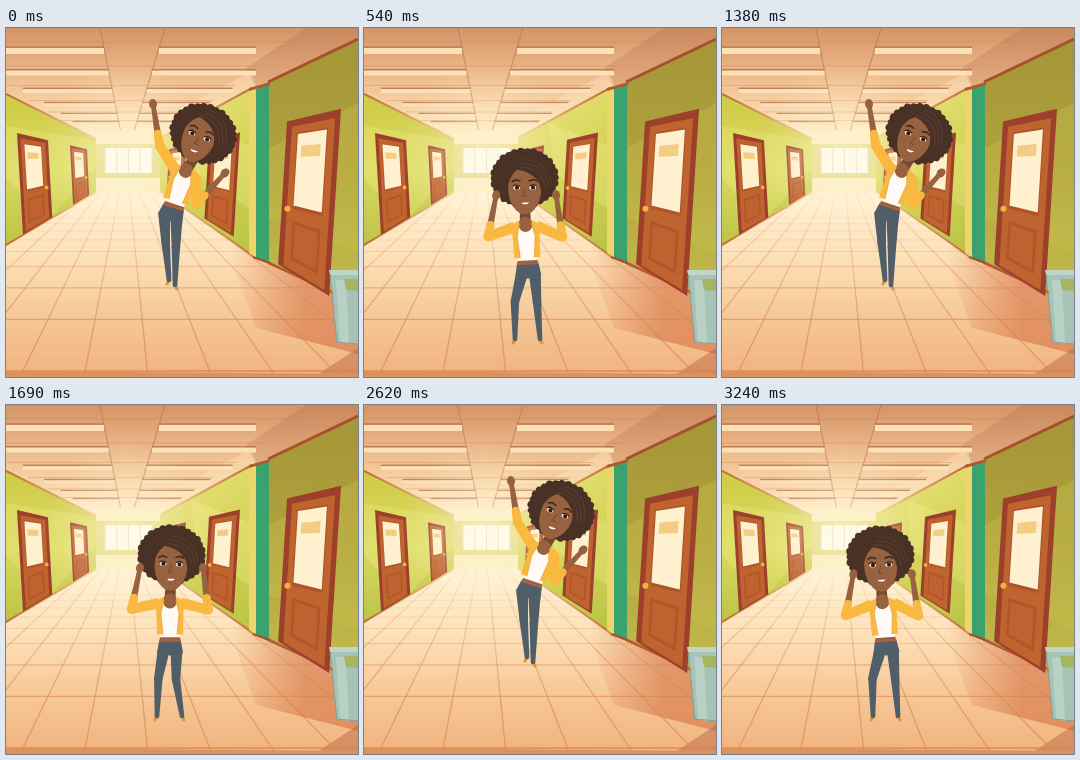
Recreate the animation shown at these times as an HTML page with a canvas. Size 352 by 349 pixels, loop 3.32 s.

```html
<!DOCTYPE html>
<html lang="en">
<head>
<meta charset="utf-8">
<title>Hallway dance</title>
<style>
html, body { margin: 0; width: 100%; height: 100%; overflow: hidden; background: #f0bc88; }
canvas { display: block; width: 352px; height: 349px; }
</style>
</head>
<body>
<canvas id="stage"></canvas>
<script>
const W = 352, H = 349, LOOP = 3320, STEP = 77, LAST = 42, CYCLE = 17.2;
const VX = 120, VY = 130; // vanishing point
const SKIN = '#96623f', SHADE = '#76482f', HAIR = '#493126', CURL = '#5f4436';
const COAT = '#f9b940', COAT_DARK = '#dfa036', JEANS = '#505e69', WOOD = '#c0642f', FRAME = '#9c402c';
const canvas = document.getElementById('stage');
const dpr = window.devicePixelRatio || 1;
canvas.width = W * dpr;
canvas.height = H * dpr;
const room = document.createElement('canvas');
room.width = canvas.width;
room.height = canvas.height;
let c = room.getContext('2d');

function trace(p) {
  c.beginPath();
  for (let i = 0; i < p.length; i += 2) c.lineTo(p[i], p[i + 1]);
}
function poly(fill, ...p) {
  trace(p);
  c.closePath();
  c.fillStyle = fill;
  c.fill();
}
function line(color, width, ...p) {
  trace(p);
  c.strokeStyle = color;
  c.lineWidth = width;
  c.stroke();
}
function oval(fill, x, y, rx, ry = rx, turn = 0) {
  c.beginPath();
  c.ellipse(x, y, rx, ry, turn, 0, Math.PI * 2);
  c.fillStyle = fill;
  c.fill();
}
function stops(g, colors) {
  colors.forEach((col, i) => g.addColorStop(i / (colors.length - 1), col));
  return g;
}
const grad = (x0, y0, x1, y1, ...colors) => stops(c.createLinearGradient(x0, y0, x1, y1), colors);

function drawCeiling() {
  poly(grad(0, 0, 0, 108, '#d29467', '#e8b283', '#f6cfa0', '#ffedc8'), 0, 0, W, 0, W, 14, 250, 60, 155, 112, 90, 112, 0, 66);
  poly('rgba(170,90,55,.22)', 240, 40, 300, 0, W, 0, W, 14, 250, 60);
  poly('rgba(255,236,195,.35)', 130, 104, 245, 44, 250, 58, 155, 108);
  for (const s of [-.2, .3]) line('rgba(190,115,75,.6)', 1.2, VX + s * 130, 0, VX + s * 28, 102);
  for (let n = 0; n < 6; n++) {
    const d = 110 / (1 + .22 * n + .04 * n * n), y = VY - d, h = d * .055;
    for (const [from, to] of [[-1.5, -.2], [.3, 1.55]]) {
      const a = Math.max(0, VX + from * d), b = Math.min(250, VX + to * d);
      line('rgba(180,105,68,.75)', 1.4, a, y - 1, b, y - 1);
      poly('#fbe0b8', a, y, b, y, b, y + h, a, y + h);
    }
    line('rgba(200,125,80,.35)', 1, VX - 1.8 * d, y - h, VX + 1.6 * d, y - h);
  }
}

function drawFloor() {
  c.save();
  trace([0, 217, 90, 163, 155, 163, 250, 231, W, 277, W, H, 0, H]);
  c.clip();
  c.fillStyle = grad(0, 162, 0, H, '#fff3d6', '#fde2bb', '#f7c998', '#efb27e');
  c.fillRect(0, 150, W, 200);
  poly(grad(225, 0, 300, 0, 'rgba(217,125,80,0)', 'rgba(217,125,80,.7)'), 215, 205, W, 277, W, 326, 250, 300);
  poly('rgba(175,85,50,.4)', 308, H, W, 320, W, H);
  const ink = grad(0, 165, 0, 300, 'rgba(218,140,85,.1)', 'rgba(212,130,78,.6)');
  for (let n = 0; n < 9; n++) {
    const d = 213 / (1 + .32 * n);
    line(ink, d / 110, 0, VY + d, W, VY + d);
  }
  for (let x = -306; x < 700; x += 64) line(ink, 1.3, VX + (x - VX) * .15, 163, x, H);
  poly('#dd925c', 0, 343, W, 346, W, H, 0, H);
  c.restore();
}

function drawWalls() {
  poly('#fbeec0', 90, 108, 156, 108, 156, 164, 90, 164);
  poly('#e6dc84', 90, 116, 156, 116, 156, 150, 90, 150);
  poly('#fffdf4', 99, 120, 146, 120, 146, 145, 99, 145);
  for (let x = 99; x < 148; x += 11.75) line('#e0ddc4', 1, x, 120, x, 145);

  poly(grad(0, 70, 0, 215, '#d0cb48', '#d9da61', '#bdc447'), 0, 66, 90, 110, 90, 163, 0, 217);
  poly('rgba(245,240,140,.25)', 0, 98, 90, 112, 90, 140, 40, 195, 0, 150);
  const leftTrim = grad(0, 0, 92, 0, '#bd6d36', '#f0cf85');
  line(leftTrim, 2, 0, 66, 90, 111);
  line(leftTrim, 2, 0, 217, 90, 164);

  poly(grad(160, 100, 250, 210, '#e6df74', '#d3d355', '#bcc548'), 154, 110, 250, 59, 250, 230, 154, 163);
  poly('rgba(250,244,160,.25)', 185, 95, 250, 120, 250, 185, 190, 145);
  const rightTrim = grad(155, 0, 250, 0, '#f0cf85', '#bd6d36');
  line(rightTrim, 2, 154, 110, 246, 60);
  line(rightTrim, 2, 154, 163, 250, 230);

  poly(grad(300, 30, 290, 260, '#a69839', '#b0a23c', '#c3bb4c'), 263, 54, W, 11, W, 277, 263, 236);
  poly('rgba(205,198,85,.3)', 263, 120, W, 75, W, 225, 263, 190);
  line('#a8502c', 3, 262, 54, W, 11);
  line('#b65a36', 2.5, 263, 235, W, 276);
  poly('#ecd56c', 243, 62, 250, 59, 250, 230, 243, 225);
  poly('#3aa26d', 250, 58, 263, 57, 263, 234, 250, 230);
  poly('#b05a33', 243, 60, 264, 54, 264, 57, 243, 63);
  line('#a9512f', 2, 247, 229, 264, 235);
}

// Door edges follow the perspective lines of the wall they stand in.
function door(x0, x1) {
  const left = x0 < VX;
  const top = x => left ? 102.5 + .23 * x : 159.5 - .235 * x;
  const bottom = x => left ? 217 - .6 * x : 163 + .62 * (x - 154);
  const at = (u, v) => {
    const x = x0 + (x1 - x0) * u, foot = x - (x - VX) * .055;
    return [x + (foot - x) * v, top(x) + (bottom(foot) - top(x)) * v];
  };
  const box = (fill, u, v, s, t) => poly(fill, ...at(u, v), ...at(s, v), ...at(s, t), ...at(u, t));
  box(FRAME, 0, 0, 1, 1);
  box(WOOD, .1, .045, .9, .985);
  box('#ad5429', .2, .09, .78, .59);
  box('#fff0d0', .22, .1, .76, .57);
  box('#f3cd83', .3, .18, .66, .25);
  box('#b1562a', .22, .67, .76, .92);
  box('#c0622f', .27, .69, .71, .9);
  oval('#f0b53f', ...at(left ? .87 : .11, .6), (x1 - x0) / 21 + .4);
}

function drawBin() {
  poly('#a6c3b8', 325, 246, W, 246, W, 316, 331, 314);
  poly('#b9d0c5', 330, 252, 340, 252, 343, 316, 334, 314);
  poly('#a5b562', 338, 251, W, 251, W, 263, 340, 262);
  poly('#bfd5ca', 323, 242, W, 242, W, 247, 324, 247);
  line('#7da49e', 1, 324, 248, 331, 314, W, 316);
}

function drawRoom() {
  drawCeiling();
  drawFloor();
  drawWalls();
  [[11, 42], [64, 81], [163, 180], [203, 234], [281, 335]].forEach(d => door(...d));
  drawBin();
  c.fillStyle = stops(c.createRadialGradient(VX, 122, 5, VX, 122, 85), ['rgba(255,246,215,.5)', 'rgba(255,246,215,.25)', 'rgba(255,246,215,0)']);
  c.fillRect(0, 0, W, H);
}

const mix = (a, b, k) => a.map((v, i) => v + (b[i] - v) * k);
const ease = k => k * k * (3 - 2 * k);

// head x, y, tilt; hip; left hand; right hand; left ankle; right ankle
const leap = [192, 112, 22, 166, 184, 147, 76, 219, 145, 163, 252, 169, 257];
const stand = [165, 163, 2, 164, 241, 134, 163, 197, 163, 151, 311, 176, 311];
const sway = [158, 164, -3, 164, 241, 131, 170, 189, 170, 151, 311, 176, 311];
const lean = [142, 171, -14, 164, 244, 122, 187, 156, 167, 151, 311, 175, 311];
const crouch = [149, 154, -10, 164, 229, 113, 163, 163, 151, 157, 294, 177, 297];
const swoop = mix(crouch, lean, 2).map((v, i) => i < 3 ? v : lean[i]);
const moves = [
  [0, leap], [1, leap], [4.4, stand], [5.4, stand], [8.2, sway], [11, sway],
  [11.9, swoop], [12.8, lean], [14, crouch], [16, leap], [CYCLE, leap]
];

function poseAt(beat) {
  const i = moves.findIndex(m => m[0] > beat);
  const [a, from] = moves[i - 1], [b, to] = moves[i];
  return mix(from, to, ease((beat - a) / (b - a)));
}

// Middle joint of a two-part limb; bend picks the side.
function joint(a, b, la, lb, bend) {
  const dx = b[0] - a[0], dy = b[1] - a[1], d = Math.hypot(dx, dy);
  const along = d > la + lb ? d * la / (la + lb) : (d * d + la * la - lb * lb) / (2 * d);
  const out = Math.sqrt(Math.max(0, la * la - along * along)) * (d > la + lb ? 0 : bend);
  return [a[0] + (dx * along - dy * out) / d, a[1] + (dy * along + dx * out) / d];
}

function taper(fill, a, b, wa, wb) {
  const d = Math.hypot(b[0] - a[0], b[1] - a[1]) || 1;
  const nx = (a[1] - b[1]) / d / 2, ny = (b[0] - a[0]) / d / 2;
  poly(fill, a[0] + nx * wa, a[1] + ny * wa, b[0] + nx * wb, b[1] + ny * wb,
    b[0] - nx * wb, b[1] - ny * wb, a[0] - nx * wa, a[1] - ny * wa);
  oval(fill, b[0], b[1], wb / 2);
}

function leg(hip, ankle, side) {
  const knee = joint(hip, ankle, 28, 37.5, 1);
  taper('#d79a3c', ankle, [ankle[0] + side * 2, ankle[1] + 4], 3.5, 3);
  taper(JEANS, hip, knee, 12, 8.5);
  taper(JEANS, knee, ankle, 8.5, 4.6);
}

function forearm(elbow, hand) {
  const cuff = mix(elbow, hand, .28);
  taper(SKIN, cuff, hand, 6.5, 4.5);
  oval(SKIN, hand[0], hand[1], 5, 4, Math.atan2(hand[1] - elbow[1], hand[0] - elbow[0]));
  taper(COAT, elbow, cuff, 9.5, 8);
  oval(COAT, elbow[0], elbow[1], 4.8);
}

function drawTorso(neck, turn, len) {
  c.save();
  c.translate(...neck);
  c.rotate(turn);
  c.scale(1, len / 50);
  poly(SKIN, -9, 36, 9, 36, 11, 47, -11, 47);
  poly('#b0603c', -10.5, 43, 10.5, 43, 11, 46, -11, 46);
  poly(JEANS, -11, 45.5, 11, 45.5, 13, 57, 0, 60, -13, 57);
  poly('#fffaf5', -9, 2, 9, 2, 10, 41, -10, 41);
  oval(SKIN, 0, 3, 7, 8);
  for (const s of [-1, 1]) {
    poly(COAT, s * 14, 3, s * 7, -1, s * 6, 2, s * 9, 16, s * 7, 38, s * 13, 38, s * 13.5, 16);
    line(COAT_DARK, .7, s * 6, 2, s * 9, 16, s * 7, 38);
  }
  c.restore();
}

function drawFace() {
  c.beginPath();
  c.moveTo(-16, -12);
  c.bezierCurveTo(-18, 4, -14, 15, -6, 21);
  c.quadraticCurveTo(0, 25, 6, 21);
  c.bezierCurveTo(14, 15, 18, 4, 16, -12);
  c.bezierCurveTo(10, -28, -10, -28, -16, -12);
  c.fillStyle = SKIN;
  c.fill();
  for (const s of [-1, 1]) {
    oval('#f3e6d8', s * 8, -4, 3.4, 2.2);
    oval('#2f1c15', s * 8 + .3, -4, 2.1);
    line('#2c1a13', 1, s * 12, -5.5, s * 9, -7, s * 4.5, -5.5);
    line('#38231a', 1.4, s * 13, -10, s * 9, -12, s * 4, -10.5);
  }
  line(SHADE, 1, 0, -3, -2, 4, 1.5, 5);
  c.beginPath();
  c.moveTo(-5.5, 10.5);
  c.quadraticCurveTo(0, 9.5, 6, 10);
  c.quadraticCurveTo(1, 17, -5.5, 10.5);
  c.fillStyle = '#a85343';
  c.fill();
  poly('#fff', -3.5, 11, 4.5, 10.7, 2, 12.6, -2, 12.6);
}

function drawHead(x, y, tilt) {
  const turn = tilt * Math.PI / 180, drop = Math.abs(tilt) * .3;
  c.save();
  c.translate(x, y);
  c.rotate(turn);
  const hx = drop * Math.sin(turn), hy = -14 + drop * Math.cos(turn);
  oval(HAIR, hx, hy, 33, 29);
  for (let i = 0; i < 30; i++) {
    const a = i * Math.PI / 15;
    oval(HAIR, hx + 31 * Math.cos(a), hy + 27 * Math.sin(a), 3.2 + .5 * Math.sin(i * 2.4));
  }
  drawFace();
  c.beginPath();
  c.moveTo(-19, 6);
  c.quadraticCurveTo(-17, -15, -7, -22);
  c.quadraticCurveTo(6, -20, 13, -11);
  c.quadraticCurveTo(17, -4, 17, 9);
  c.lineTo(26, 2);
  c.quadraticCurveTo(27, -34, 3, -36);
  c.quadraticCurveTo(-24, -32, -24, -6);
  c.fillStyle = HAIR;
  c.fill();
  c.strokeStyle = CURL;
  c.lineWidth = .8;
  for (let i = 0; i < 3; i++) {
    c.beginPath();
    c.moveTo(-7 + i * 3, -24 - i * 4);
    c.quadraticCurveTo(16 + i * 3, -26 - i * 3, 21 + i * 3, -3 - i * 2);
    c.stroke();
  }
  c.restore();
}

function drawDancer(p) {
  const [x, y, tilt] = p, turn = tilt * Math.PI / 180;
  const hip = p.slice(3, 5), handL = p.slice(5, 7), handR = p.slice(7, 9);
  const neck = [x - 30 * Math.sin(turn), y + 30 * Math.cos(turn)];
  const dx = hip[0] - neck[0], dy = hip[1] - neck[1], len = Math.hypot(dx, dy);
  const off = (o, side, down) => [o[0] + (dy * side + dx * down) / len, o[1] + (dy * down - dx * side) / len];
  const shoulderL = off(neck, -11, 5), shoulderR = off(neck, 11, 5);
  const elbowL = joint(shoulderL, handL, 28, 42, -1), elbowR = joint(shoulderR, handR, 28, 42, 1);
  leg(off(hip, -6.5, 5), p.slice(9, 11), -1);
  leg(off(hip, 6.5, 5), p.slice(11, 13), 1);
  taper(SHADE, [x, y + 12], off(neck, 0, 3), 10, 11);
  drawTorso(neck, Math.atan2(dy, dx) - Math.PI / 2, len);
  taper(COAT, shoulderL, elbowL, 11, 9.5);
  taper(COAT, shoulderR, elbowR, 11, 9.5);
  drawHead(x, y, tilt);
  forearm(elbowL, handL);
  forearm(elbowR, handR);
}

c.scale(dpr, dpr);
drawRoom();
c = canvas.getContext('2d');
c.scale(dpr, dpr);

const start = performance.now();
function tick() {
  const t = (performance.now() - start) % LOOP;
  const beat = Math.min(LAST, Math.floor((t + 7) / STEP)) % CYCLE;
  c.drawImage(room, 0, 0, W, H);
  drawDancer(poseAt(beat));
  requestAnimationFrame(tick);
}
tick();
</script>
</body>
</html>
```
